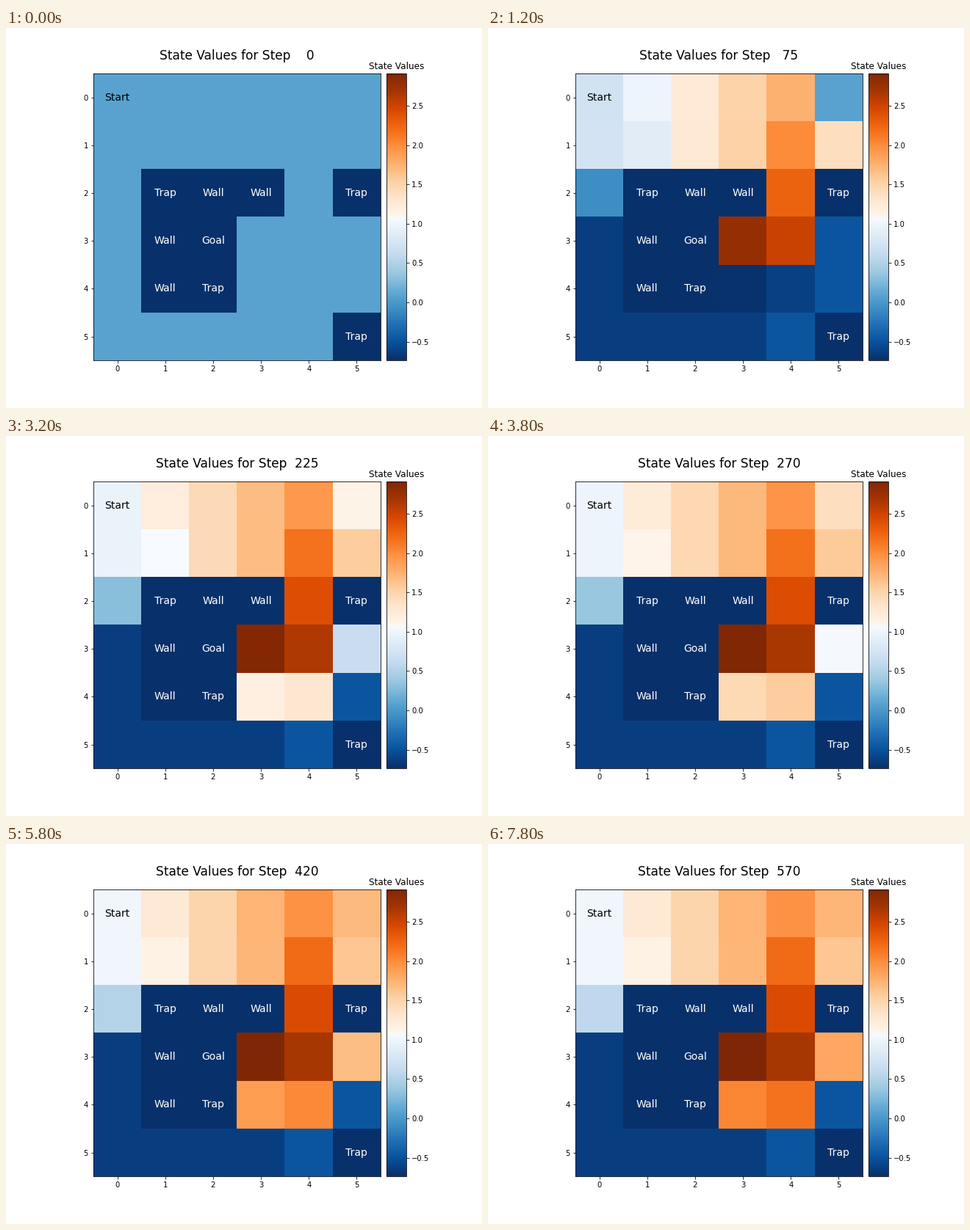
A matplotlib script that plays this animation: 648 px wide and 518 px high, repeating every 8 s.

```python
import numpy as np
import matplotlib.pyplot as plt
from matplotlib.animation import FuncAnimation
from matplotlib.colors import ListedColormap

W, H, DPI = 648, 518, 72
FRAMES, INTERVAL = 40, 200
LEFT, TOP, SIZE = 119.0, 62.17, 391.0
VMIN, VMAX = -0.738, 2.909
INITIAL = 0.085

MAZE = ["S.....",
        "......",
        ".TWW.T",
        ".WG...",
        ".WT...",
        ".....T"]
NAMES = {"S": "Start", "T": "Trap", "W": "Wall", "G": "Goal"}
CELLS = [(r, c) for r in range(6) for c in range(6)]
OPEN = {cell for cell in CELLS if MAZE[cell[0]][cell[1]] in "S."}
LAST_STEP = (3, 3)

# Cells learned late: lowest value, frame at which they recover, time constant.
LATE = {
    (0, 5): (INITIAL, 11, 5),
    (2, 0): (-0.25, 3, 14),
    (3, 5): (-0.48, 11, 7.5),
    (4, 3): (-0.72, 6, 9),
    (4, 4): (-0.62, 6, 9),
}


def neighbours(cell):
    r, c = cell
    near = [(r - 1, c), (r + 1, c), (r, c - 1), (r, c + 1)]
    return [p for p in near if 0 <= p[0] < 6 and 0 <= p[1] < 6]


def steps_to_goal():
    steps, queue = {LAST_STEP: 0}, [LAST_STEP]
    for cell in queue:
        for p in neighbours(cell):
            if p in OPEN and p not in steps:
                steps[p] = steps[cell] + 1
                queue.append(p)
    return steps


STEPS = steps_to_goal()


def limit(cell):
    """Settled value: falls with distance, less off the main lane and near traps."""
    r, c = cell
    value = 2.905 - 0.235 * STEPS[cell]
    if r != 0 and c != 4 and cell != LAST_STEP:
        value -= 0.24
        if any(MAZE[y][x] == "T" for y, x in neighbours(cell)):
            value -= 0.12
    if r >= 3 and cell in LATE:
        value -= 0.2
    return value


def sink(n, floor):
    return max(floor, INITIAL - 0.41 * np.log1p(n))


def value_at(cell, n):
    r, c = cell
    if cell not in OPEN:
        return VMIN
    if cell in LATE:
        floor, delay, tau = LATE[cell]
        if n <= delay:
            return sink(n, floor)
        end = limit(cell)
        return end + (floor - end) * np.exp(-(n - delay) / tau)
    if r >= 3 and cell not in (LAST_STEP, (3, 4)):
        return sink(n, -0.48 if r + c == 9 else -0.625)
    gap = (0.17 + 0.025 * STEPS[cell]) * np.exp(-(n / 12) ** 2)
    rise = min(1, np.log1p(n) / np.log1p(3))
    return INITIAL + (limit(cell) - gap - INITIAL) * rise


def state_values(n):
    return np.array([value_at(cell, n) for cell in CELLS]).reshape(6, 6)


def title_text(n):
    return f"State Values for Step {15 * max(n - 1, 0):4d}"


def add_axes(x, width):
    return fig.add_axes([x / W, 1 - (TOP + SIZE) / H, width / W, SIZE / H])


plt.rcParams["font.family"] = "DejaVu Sans"
half = np.linspace(0, 1, 128)
cmap = ListedColormap(np.vstack([plt.cm.Blues_r(half), plt.cm.Oranges(half)]))

fig = plt.figure(figsize=(W / DPI, H / DPI), dpi=DPI, facecolor="white")
ax = add_axes(LEFT, SIZE)
cax = add_axes(LEFT + 1.02 * SIZE, 0.07 * SIZE)

image = ax.imshow(state_values(0), cmap=cmap, vmin=VMIN, vmax=VMAX,
                  aspect="auto", interpolation="nearest")
ax.set_xticks(range(6))
ax.set_yticks(range(6))
title = ax.set_title(title_text(0), fontsize=17, pad=19.4)

for r, c in CELLS:
    mark = MAZE[r][c]
    if mark in NAMES:
        ax.text(c, r, NAMES[mark], ha="center", va="center", fontsize=14,
                color="black" if mark == "S" else "white")

fig.colorbar(image, cax=cax, ticks=np.arange(-0.5, 2.6, 0.5))
cax.set_title("State Values", fontsize=12)


def update(n):
    image.set_data(state_values(n))
    title.set_text(title_text(n))
    return image, title


anim = FuncAnimation(fig, update, frames=FRAMES, interval=INTERVAL,
                     repeat=True, repeat_delay=0, blit=False)
plt.show()
```
